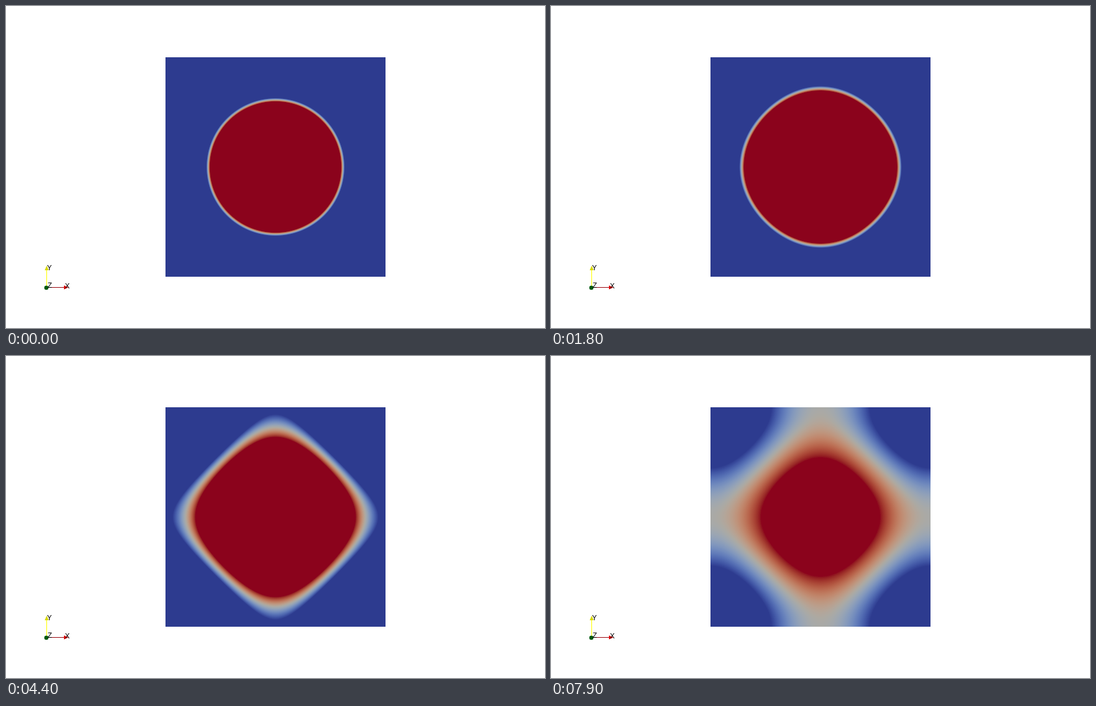
An HTML page with a canvas that plays this animation: 828x496 px, repeating every 8000 ms.

```html
<!DOCTYPE html>
<html lang="en">
<head>
<meta charset="utf-8">
<title>Phase field</title>
<style>
html, body { margin: 0; width: 100%; height: 100%; overflow: hidden; background: #fff; }
canvas { display: block; }
</style>
</head>
<body>
<canvas id="stage" width="828" height="496"></canvas>
<script>
const ctx = document.getElementById('stage').getContext('2d');
const SIZE = 338, LEFT = 245, TOP = 79, LOOP = 8000, STEP = 100;

const gamma = v => v > .0031308 ? 1.055 * v ** (1 / 2.4) - .055 : 12.92 * v;
const toByte = v => Math.round(255 * Math.min(1, Math.max(0, v)));

// Diverging blue-grey-red map: polar Lab coordinates, then sRGB, then shading
function diverging(u) {
  const side = Math.abs(2 * u - 1);
  const m = 88 - 8 * side, sat = 1.08 * side;
  const hue = u < .5 ? -1.661 + .561 * side : 1.061 - .561 * side;
  const fy = (m * Math.cos(sat) + 16) / 116;
  const fx = fy + m * Math.sin(sat) * Math.cos(hue) / 500;
  const fz = fy - m * Math.sin(sat) * Math.sin(hue) / 200;
  const x = .9505 * fx ** 3, y = fy ** 3, z = 1.089 * fz ** 3;
  const r = toByte(.775 * gamma(3.2406 * x - 1.5372 * y - .4986 * z));
  const g = toByte(.768 * gamma(-.9689 * x + 1.8758 * y + .0415 * z));
  const b = toByte(.742 * gamma(.0557 * x - .204 * y + 1.057 * z));
  return (255 << 24 | b << 16 | g << 8 | r) >>> 0;
}
const palette = Array.from({ length: 256 }, (_, n) => diverging(n / 255));

const axis = Array.from({ length: SIZE }, (_, i) => {
  const pos = i + .5 - SIZE / 2;
  return { pos, cos: Math.cos(pos * 2 * Math.PI / SIZE) };
});
const image = ctx.createImageData(SIZE, SIZE);
const pixels = new Uint32Array(image.data.buffer);

// A sharp growing disc gives way to a soft periodic cosine field
function drawField(t) {
  const radius = 103.5 + 10.6 * t ** .65;
  const disc = .18 * Math.max(0, 1 - (t / 4.9) ** 1.4) ** 1.3;
  const late = Math.max(0, t - 3.7) ** 2;
  const wave = 1.6 * Math.min(1, t / 3) - .0575 * late;
  const level = .1 - .0047 * late;
  let n = 0;
  for (const y of axis) {
    for (const x of axis) {
      const u = .5 + disc * (radius - Math.hypot(x.pos, y.pos)) + wave * (x.cos + y.cos - level);
      pixels[n++] = palette[toByte(u)];
    }
  }
  ctx.putImageData(image, LEFT, TOP);
}

function shape(color, ...points) {
  ctx.fillStyle = color;
  ctx.beginPath();
  points.forEach(p => ctx.lineTo(...p));
  ctx.fill();
}

function drawAxes() {
  ctx.fillStyle = '#ff0';
  ctx.fillRect(62, 405, 1, 29);
  shape('#d8d800', [62.5, 400], [65.5, 407], [59.5, 407]);
  ctx.fillStyle = '#a01018';
  ctx.fillRect(62, 433, 28, 1);
  shape('#e00000', [96, 433.5], [89, 436.5], [89, 430.5]);
  ctx.fillStyle = '#005a10';
  ctx.beginPath();
  ctx.arc(62, 434, 3.2, 0, 7);
  ctx.fill();
  ctx.fillStyle = '#000';
  ctx.font = '11px "Liberation Sans", Arial, sans-serif';
  ctx.fillText('Y', 63, 407);
  ctx.fillText('X', 90.5, 434.5);
  ctx.fillText('Z', 64, 434);
}

ctx.fillStyle = '#fff';
ctx.fillRect(0, 0, 828, 496);
drawAxes();

const start = performance.now();
let shown = -1;
function frame() {
  const step = Math.floor((performance.now() - start) % LOOP / STEP);
  if (step !== shown) drawField(step * STEP / 1000);
  shown = step;
  requestAnimationFrame(frame);
}
frame();
</script>
</body>
</html>
```
